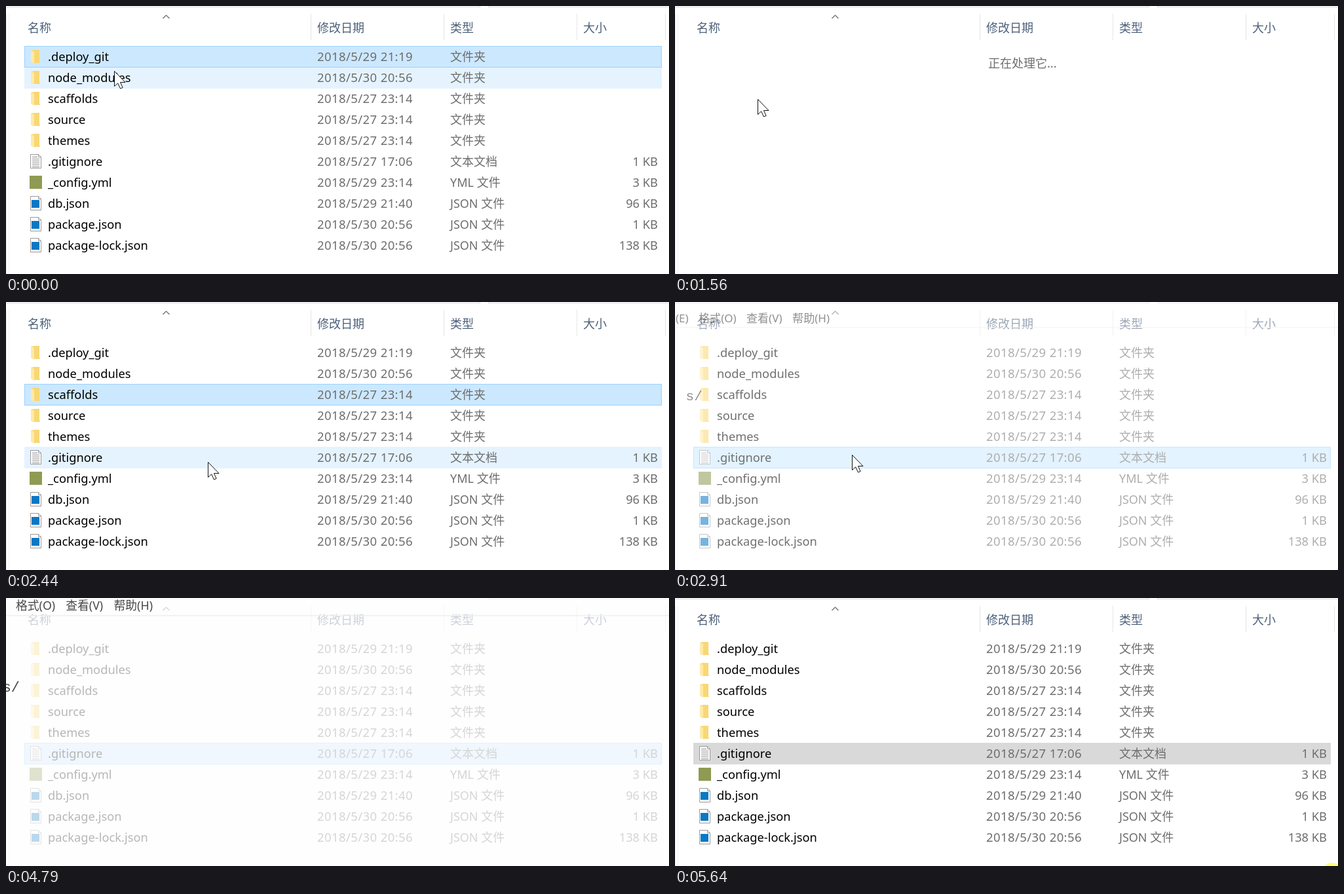
Write an HTML page with a canvas that moves like this. It is 1012 px wide and 409 px high and loops after 5.72 s.

```html
<!DOCTYPE html>
<html lang="zh-CN">
<head>
<meta charset="utf-8">
<title>Folder browser</title>
<style>
  html, body { margin: 0; width: 100%; height: 100%; overflow: hidden; background: #fff; }
  canvas { display: block; }
</style>
</head>
<body>
<canvas id="stage" width="1012" height="409"></canvas>
<script>
const ctx = document.getElementById('stage').getContext('2d');
const LOOP = 5720;
const SANS = '"Noto Sans", "Noto Sans CJK SC", "Noto Sans CJK", sans-serif';
const MONO = '"Liberation Mono", monospace';
const TOP = 61, ROW = 32;

// Bursts of updates: first time, last time, count
const bursts = [
  [0, 0, 1], [70, 310, 4], [630, 710, 2], [940, 1090, 3], [1260, 1260, 1],
  [1410, 1640, 4], [1810, 2350, 8], [2440, 2760, 5], [2910, 3320, 6],
  [4790, 5330, 8], [5410, 5410, 1], [5640, 5640, 1]
];
const steps = bursts.flatMap(([a, b, n]) =>
  Array.from({ length: n }, (_, i) => n > 1 ? Math.round(a + (b - a) * i / (n - 1)) : a));

// Pointer path: time, x, y
const path = [
  [0, 165, 99], [70, 158, 106], [150, 150, 114], [310, 148, 116], [710, 148, 116],
  [940, 144, 120], [1090, 144, 120], [1260, 126, 142], [1640, 126, 142],
  [1810, 140, 160], [1970, 190, 235], [2190, 285, 371], [2350, 318, 290],
  [2440, 308, 244], [2600, 270, 233]
];

// Click rings: first time, end time
const clicks = [[150, 310], [1260, 1410], [2600, 2800]];

const folder = (name, date = '2018/5/27 23:14') => ({ name, date, type: '文件夹', icon: drawFolder });
const file = (name, date, type, size, icon) => ({ name, date, type, size, icon });

const root = [
  folder('.deploy_git', '2018/5/29 21:19'),
  folder('node_modules', '2018/5/30 20:56'),
  folder('scaffolds'),
  folder('source'),
  folder('themes'),
  file('.gitignore', '2018/5/27 17:06', '文本文档', '1 KB', drawTextFile),
  file('_config.yml', '2018/5/29 23:14', 'YML 文件', '3 KB', drawYml),
  file('db.json', '2018/5/29 21:40', 'JSON 文件', '96 KB', drawJson),
  file('package.json', '2018/5/30 20:56', 'JSON 文件', '1 KB', drawJson),
  file('package-lock.json', '2018/5/30 20:56', 'JSON 文件', '138 KB', drawJson)
];
const modules = ['.bin', 'abbrev', 'accepts', 'align-text', 'amdefine', 'ansi-regex',
  'ansi-styles', 'anymatch', 'archy', 'argparse', 'array-unique'].map(n => folder(n));
const drafts = ['draft.md', 'page.md', 'post.md'].map(n =>
  file(n, '2018/5/27 23:14', 'MD 文件', '1 KB', drawJson));

// Value of the last entry whose time has passed
const at = (t, list) => list.filter(e => e[0] <= t).pop()[1];
const views = [[0, root], [630, null], [710, modules], [1000, null], [1090, root],
  [1410, null], [1640, drafts], [1960, root]];
const picks = [[0, 0], [150, 1], [1260, 2], [2600, 5]];

function rect(x, y, w, h, color) {
  ctx.fillStyle = color;
  ctx.fillRect(x, y, w, h);
}

function line(points, color, width = 1) {
  ctx.beginPath();
  points.forEach(([x, y]) => ctx.lineTo(x, y));
  ctx.strokeStyle = color;
  ctx.lineWidth = width;
  ctx.stroke();
}

function poly(points, fill, stroke) {
  ctx.beginPath();
  points.forEach(([x, y]) => ctx.lineTo(x, y));
  ctx.closePath();
  ctx.fillStyle = fill;
  ctx.fill();
  if (stroke) {
    ctx.strokeStyle = stroke;
    ctx.lineWidth = 1;
    ctx.stroke();
  }
}

function disc(x, y, r, color) {
  ctx.beginPath();
  ctx.arc(x, y, r, 0, Math.PI * 2);
  ctx.fillStyle = color;
  ctx.fill();
}

function text(str, x, y, color, { size = 18.3, align = 'left', gap = 0, font = SANS } = {}) {
  ctx.font = `${size}px ${font}`;
  ctx.letterSpacing = gap + 'px';
  ctx.textAlign = align;
  ctx.fillStyle = color;
  ctx.fillText(str, x, y);
}

// Icons take the top edge of their row
function drawFolder(y) {
  poly([[38, y + 7], [43, y + 6], [51, y + 6], [51, y + 23], [52, y + 26], [42, y + 26], [38, y + 24]], '#f8d775');
  poly([[38, y + 7], [43, y + 9], [43, y + 27], [38, y + 24]], '#ffe9a6');
}

function drawPage(y) {
  poly([[37.5, y + 5.5], [49.5, y + 5.5], [53.5, y + 9.5], [53.5, y + 26.5], [37.5, y + 26.5]], '#fff', '#9a9a9a');
  line([[49.5, y + 5.5], [49.5, y + 9.5], [53.5, y + 9.5]], '#9a9a9a');
}

function drawTextFile(y) {
  drawPage(y);
  for (let i = 0; i < 6; i++) rect(40, y + 9 + i * 3, i ? 11 : 8, 1, '#8c8c8c');
}

function drawJson(y) {
  drawPage(y);
  rect(39, y + 11, 12, 12, '#0b78c4');
}

function drawYml(y) {
  rect(36, y + 6, 19, 20, '#8f9a52');
}

function drawHeader() {
  rect(0, 1, 724, 1, '#d9d9d9');
  rect(736, 1, 276, 1, '#d9d9d9');
  rect(723, 0, 1, 2, '#d9d9d9');
  rect(736, 0, 1, 2, '#d9d9d9');
  rect(0, 12, 1, 397, '#ebebeb');
  rect(4, 12, 1, 397, '#f3f3f3');
  for (const x of [465, 668, 871, 1006]) rect(x, 12, 1, 40, '#e5e5e5');
  line([[239.5, 19], [244.5, 14], [249.5, 19]], '#6b6b6b', 1.2);
  [['名称', 33], ['修改日期', 475], ['类型', 678], ['大小', 881]].forEach(([s, x]) =>
    text(s, x, 39.5, '#4c607a', { size: 18 }));
}

function drawList(items, hover, pick, dim) {
  if (hover >= 0 && hover < items.length) rect(28, TOP + hover * ROW, 973, 33, '#e5f3ff');
  if (pick >= 0) {
    const y = TOP + pick * ROW;
    rect(28, y, 973, 33, dim ? '#d9d9d9' : '#99d1ff');
    if (!dim) rect(29, y + 1, 971, 31, '#cce8ff');
  }
  items.forEach((it, i) => {
    const y = TOP + i * ROW, base = y + 22.5;
    it.icon(y);
    text(it.name, 64, base, '#000');
    text(it.date, 475, base, '#6d6d6d', { size: 18.5, gap: 0.4 });
    text(it.type, 678, base, '#6d6d6d', { size: 18 });
    if (it.size) text(it.size, 995, base, '#6d6d6d', { align: 'right' });
  });
}

function drawArrow([x, y]) {
  const shape = [[0, 0], [0, 23], [5.2, 18.3], [9, 26.5], [12.6, 25], [9, 17], [16.5, 17]];
  poly(shape.map(([a, b]) => [x + a + 0.5, y + b + 0.5]), '#fff', '#111');
}

function drawBeam(x, y) {
  rect(x, y - 11, 2, 22, '#ececec');
  rect(x - 6, y - 12, 14, 2, '#ececec');
  rect(x - 6, y + 11, 14, 2, '#ececec');
}

function drawEditor(alpha, scale) {
  ctx.save();
  ctx.globalAlpha = alpha;
  rect(0, 0, 1012, 409, '#fefefe');
  ctx.translate(506, 309);
  ctx.scale(scale, scale);
  ctx.translate(-506, -309);
  rect(-200, 23, 1500, 2, '#efefef');
  [['编辑(E)', -63], ['格式(O)', 10], ['查看(V)', 87], ['帮助(H)', 161]].forEach(([s, x]) =>
    text(s, x, 15.5, '#000', { size: 18 }));
  text('s/', -10.5, 141, '#000', { size: 22, font: MONO });
  ctx.restore();
}

function pointer(t) {
  const i = path.findIndex(p => p[0] > t);
  if (i < 0) return path[path.length - 1].slice(1);
  const [t0, x0, y0] = path[i - 1], [t1, x1, y1] = path[i];
  const k = (t - t0) / (t1 - t0);
  return [Math.round(x0 + (x1 - x0) * k), Math.round(y0 + (y1 - y0) * k)];
}

function drawClicks(t, [x, y]) {
  for (const [a, b] of clicks) {
    if (t < a || t >= b) continue;
    const k = (t - a) / (b - a);
    disc(x + 15, y + 17, 45, `rgba(255, 255, 80, ${0.4 - 0.3 * k})`);
  }
}

function render(time) {
  const t = steps.filter(s => s <= time).pop();
  const tip = pointer(t);
  const browsing = t < 2910;
  const items = at(t, views);
  rect(0, 0, 1012, 409, '#fff');

  if (t < 3150 || t >= 4790) {
    drawHeader();
    if (items) {
      const hover = browsing ? Math.floor((tip[1] - TOP) / ROW) : -1;
      const pick = items === root ? at(t, picks) : -1;
      drawList(items, hover, pick, t >= 5640);
    } else {
      text('正在处理它...', 478, 94, '#6d6d6d', { size: 18 });
    }
  }

  if (t >= 2910 && t < 4790) {
    const k = Math.min(1, (t - 2910 + 80) / 320);
    drawEditor(1 - (1 - k) ** 2, 0.93 + 0.07 * k);
    if (t >= 2990) drawBeam(270, 233);
  } else if (t >= 4790) {
    const k = (t - 4790) / 77;
    const alpha = 0.72 - 0.3 * k;
    if (alpha > 0) drawEditor(alpha, 0.99 - 0.02 * k);
  }

  if (t < 2990) {
    drawClicks(t, tip);
    drawArrow(tip);
  } else if (t >= 5640) {
    disc(1003, 420, 16, '#ffff70');
  } else if (t >= 5410) {
    drawArrow([1000, 399]);
  }
}

const begin = performance.now();
function loop() {
  render((performance.now() - begin) % LOOP);
  requestAnimationFrame(loop);
}
render(0);
requestAnimationFrame(loop);
</script>
</body>
</html>
```
